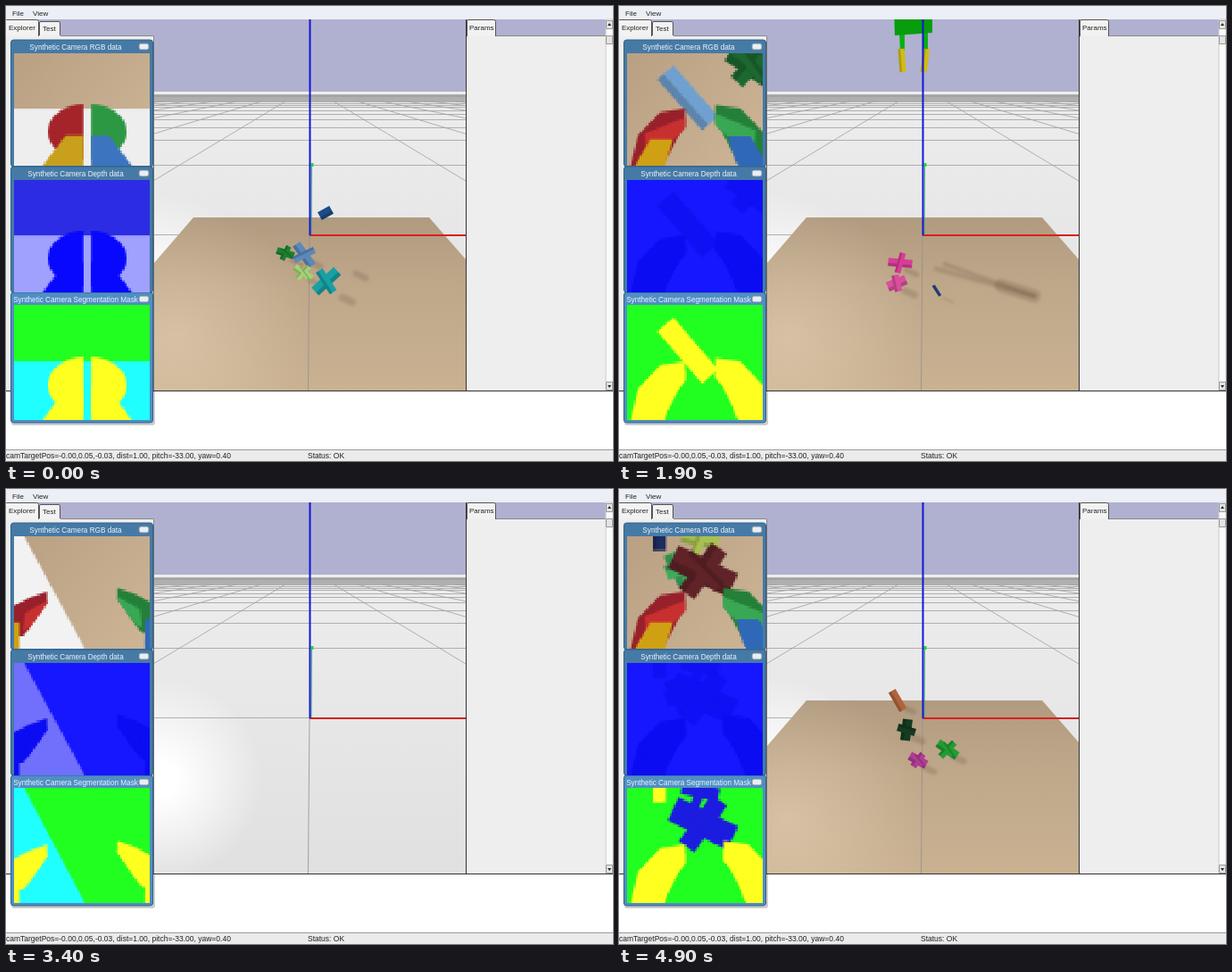
An HTML page with a canvas that plays this animation: 680x510 px, repeating every 5000 ms.

```html
<!DOCTYPE html>
<html>
<head>
<meta charset="utf-8">
<style>
html, body { margin: 0; width: 100%; height: 100%; overflow: hidden; background: #fff; }
svg, canvas { position: absolute; left: 0; top: 0; }
text { font: 8px "Liberation Sans", Arial, sans-serif; fill: #222; }
.title { font-size: 8.2px; fill: #eef4fa; text-anchor: middle; }
.status { font-size: 8.5px; }
.tab { fill: #f2f2f2; stroke: #555; }
</style>
</head>
<body>
<svg width="680" height="510">
  <rect width="680" height="15" fill="#eceff5"/>
  <path d="M0 15h680v18H0z" fill="#b0b0d0"/>
  <path d="M0 33h166v398H0zM516 33h164v398H516z" fill="#eee"/>
  <path d="M61 33.5H165.5V431M548 33.5H672" fill="none" stroke="#888"/>
  <path class="tab" d="M-1 34V17q0-1.500 1.500-1.500H34.500q2 0 2 2V34M37.500 33V19q0-1.500 1.500-1.500H59q1.500 0 1.500 1.500V33M516.500 34V17q0-1.500 1.500-1.500H546.500q2 0 2 2V34"/>
  <path d="M672 15h8v416h-8z" fill="#fafafa" stroke="#ccc"/>
  <path d="M672.500 16.500h7v9h-7zM672.500 421.500h7v9h-7zM672.500 33.500h7v9h-7z" fill="#e4e4e4" stroke="#999"/>
  <path d="M674 22l2-3 2 3zM674 425l2 3 2-3z" fill="#222"/>
  <path d="M0 431.500H680M515.500 15V431" stroke="#333"/>
  <path d="M0 497h680v13H0z" fill="#ebebeb"/>
  <path d="M0 497.500H680" stroke="#999"/>
  <rect x="6" y="40" width="161" height="430" rx="3" fill="#0003"/>
  <g id="windows"></g>
  <text x="7" y="10.500">File</text><text x="30" y="10.500">View</text>
  <text x="3" y="26.500">Explorer</text><text x="41" y="27.500">Test</text><text x="519" y="26.500">Params</text>
  <text class="status" x="0" y="507">camTargetPos=-0.00,0.05,-0.03, dist=1.00, pitch=-33.00, yaw=0.40</text>
  <text class="status" x="338" y="507">Status: OK</text>
</svg>
<canvas id="stage" width="680" height="510"></canvas>
<script>
const g = document.getElementById('stage').getContext('2d');
const small = document.createElement('canvas');
small.width = 64; small.height = 53;
const s = small.getContext('2d');
const LOOP = 5000, STEP = 100;
const YEL = '#ffff20', CYAN = '#20ffff', BLUE = '#1c1ce0', LIME = '#20ff20';

const clamp = v => Math.max(0, Math.min(1, v));
const mix = (a, b, k) => a + (b - a) * k;

// title, top, bottom, image top, image height, color
const windows = [
  ['RGB data', 38, 180, 53, 126, '#467aa6'],
  ['Depth data', 180, 321, 195, 126, '#467aa6'],
  ['Segmentation Mask', 321, 467, 335, 129, '#4f8fc4']
];
document.getElementById('windows').innerHTML = windows.map(([name, y, end, , , fill]) => `
  <rect x="5.500" y="${y}" width="159" height="${end - y}" rx="3" fill="${fill}" stroke="#2f618c"/>
  <text class="title" x="78" y="${y + 10.5}">Synthetic Camera ${name}</text>
  <rect x="149" y="${y + 4}" width="11" height="7" rx="2" fill="#e8eef4" stroke="#789"/>`).join('');

function fill(c, p, color) {
  c.beginPath();
  for (let i = 0; i < p.length; i += 2) c.lineTo(p[i], p[i + 1]);
  c.fillStyle = color;
  c.fill();
}

// random-looking solid: bars crossing at one point, each shorter and thinner
function solid(c, color, x, y, len, wid, angle, arms, shaded = true) {
  c.save();
  c.translate(x, y);
  c.rotate(angle);
  for (let i = 0; i < arms; i++) {
    const l = len * (1 - .15 * i), w = wid * (1 - .25 * i);
    c.fillStyle = color;
    c.fillRect(-l / 2, -w / 2, l, w);
    if (shaded) {
      c.fillStyle = '#0000002c';
      c.fillRect(-l / 2, w / 8, l, w * 3 / 8);
    }
    c.rotate(1.74);
  }
  c.restore();
}

/* ---------- 3D view ---------- */

// objects: color, x, y, length, width, angle, arms; they land in turn from `first` every `gap` ms
// grip: time, palm x, palm y, finger spread; held: object index, grab time, palm y
const episodes = [
  { from: 0, first: -400, gap: 175, held: [1, 1000, 238], cast: [385, 306, 458, 331],
    grip: [[500, 326, 40, 10], [800, 326, 220, 10], [1000, 326, 238, 8], [1200, 326, 205, 7]],
    objects: [
      ['#1c8030', 313, 277, 20, 8, .3, 3],
      ['#5c89ba', 334, 279, 30, 10, .95, 2],
      ['#a4d274', 333, 299, 23, 8, .6, 3],
      ['#18a0a4', 370, 319, 34, 12, -.5, 2],
      ['#1c4c88', 385, 292, 15, 10, .1, 1]
    ] },
  { from: 1300, first: 1300, gap: 310, held: [3, 2250, 206], cast: [360, 292, 465, 325], swap: true,
    grip: [[1900, 329, 20, 13], [2250, 329, 232, 9], [2400, 329, 206, 9], [2700, 329, 30, 9]],
    objects: [
      ['#1c4478', 356, 319, 14, 3.5, 1, 1],
      ['#d83c98', 315, 288, 27, 9, .1, 2],
      ['#d8509c', 313, 311, 22, 11, -.35, 2],
      ['#b07068', 337, 263, 21, 8, .3, 2]
    ] },
  { from: 3400, empty: true, objects: [] },
  { from: 3500, first: 3700, gap: 80, held: [2, 4400, 236], cast: [370, 307, 508, 357],
    grip: [[3900, 338, 20, 18], [4200, 338, 206, 18], [4400, 338, 236, 15], [4600, 338, 208, 9]],
    objects: [
      ['#1c76b8', 314, 285, 26, 9, 0, 2],
      ['#a0b03c', 324, 309, 28, 12, -.5, 3],
      ['#583034', 336, 287, 26, 12, 1, 3],
      ['#202c60', 348, 303, 21, 9, 1.65, 1]
    ] },
  { from: 4700, first: 4750, gap: 50, objects: [
      ['#b03c94', 335, 304, 21, 10, .5, 3],
      ['#143c20', 322, 270, 24, 11, 1.7, 2],
      ['#249c34', 368, 292, 26, 10, .6, 3],
      ['#b0643c', 312, 237, 25, 9, 1.05, 1]
    ] }
];

function shadow(x1, y1, x2, y2, w) {
  g.save();
  g.filter = 'blur(1.5px)';
  g.lineCap = 'round';
  line('#50402c30', w, x1, y1, x2, y2);
  g.restore();
}

function line(color, w, x1, y1, x2, y2) {
  g.strokeStyle = color; g.lineWidth = w;
  g.beginPath(); g.moveTo(x1, y1); g.lineTo(x2, y2); g.stroke();
}

function gripperAt(keys, t) {
  if (!keys || t < keys[0][0] || t > keys.at(-1)[0]) return null;
  const i = Math.max(1, keys.findIndex(k => k[0] >= t)), a = keys[i - 1], b = keys[i];
  return a.map((v, n) => mix(v, b[n], (t - a[0]) / (b[0] - a[0])));
}

function drawGripper([, x, y, spread], swap) {
  const [palm, tip] = swap ? ['#08b010', '#d0bc10'] : ['#d0c408', '#109020'];
  for (const side of [-1, 1]) {
    const f = x + 1 + side * spread;
    fill(g, [f - 3, y + 10, f + 3, y + 10, f + 3, y + 30, f - 2, y + 30], palm);
    solid(g, tip, f, y + 41, 26, 7, 1.6 + side * .1, 1);
  }
  fill(g, [x - 21, y - 13, x + 17, y - 14, x + 22, y - 8, x + 22, y + 10, x - 20, y + 13], palm);
  fill(g, [x - 20, y - 6, x + 22, y - 8, x + 22, y + 10, x - 20, y + 13], '#0000001c');
}

function drawGround() {
  g.fillStyle = '#b0b0d0'; g.fillRect(166, 15, 349, 82);
  let b = g.createLinearGradient(0, 96, 0, 431);
  b.addColorStop(0, '#ededed'); b.addColorStop(1, '#e0e0e0');
  g.fillStyle = b; g.fillRect(166, 96, 349, 335);
  b = g.createRadialGradient(172, 325, 20, 172, 325, 115);
  b.addColorStop(0, '#fff'); b.addColorStop(1, '#fff0');
  g.fillStyle = b; g.fillRect(166, 96, 349, 335);
  // unit grid seen in perspective
  for (let i = -10; i <= 10; i++) {
    const y = Math.round(90.6 + 185 / (11.12 + i)) + .5;
    line('#a0a0a0', .8, 166, y, 515, y);
    if (i) line('#a0a0a0', .8, 340 + i * 27.2, 107, 340 + i * 565, 431);
  }
}

function drawTable() {
  const b = g.createLinearGradient(0, 237, 0, 431);
  b.addColorStop(0, '#b19b80'); b.addColorStop(.4, '#bfa78a'); b.addColorStop(1, '#c9b192');
  const edge = [210,237, 474,237, 515,284, 515,431, 166,431, 166,288];
  fill(g, edge, b);
  const light = g.createRadialGradient(190, 370, 5, 190, 370, 150);
  light.addColorStop(0, '#ead8bc78'); light.addColorStop(1, '#ead8bc00');
  fill(g, edge, light);
}

function drawObject(e, i, t, hand) {
  const [color, x, y, len, wid, angle, arms] = e.objects[i];
  const u = Math.max(0, (e.first + i * e.gap - t) / 300);
  if (u > 1) return;
  let lift = 0;
  if (e.held && e.held[0] === i) {
    const [, grab, palm] = e.held;
    if (t >= grab && !hand) return;
    lift = (t < grab ? Math.max(...e.grip.map(k => k[2])) : hand[2]) - palm;
  }
  shadow(x + 7, y + 8, x + 18, y + 13, wid * .7);
  solid(g, color, x - 27 * u, y - 60 * u * u + lift, len, wid, angle - .6 * u, arms);
}

function drawView(t) {
  const e = episodes.findLast(e => t >= e.from);
  const hand = gripperAt(e.grip, t);
  g.save();
  g.beginPath(); g.rect(166, 15, 349, 416); g.clip();
  drawGround();
  if (!e.empty) drawTable();
  line('#909090', .8, 340, 257, 338.5, 431);
  if (hand) {
    const [x1, y1, x2, y2] = e.cast;
    for (const d of [-5, 5]) shadow(x1 + d, y1 - d / 2, x2, y2, 5);
    shadow(mix(x1, x2, .65), mix(y1, y2, .65), x2, y2, 15);
  }
  line('#d82020', 2, 340, 257, 515, 257);
  line('#30b070', 1, 342.5, 180, 342, 256);
  line('#10e030', 3, 343, 176, 343, 180);
  if (hand) drawGripper(hand, e.swap);
  line('#1414d8', 2, 340.5, 15, 340.5, 257);
  e.objects.forEach((_, i) => drawObject(e, i, t, hand));
  g.restore();
}

/* ---------- camera windows ---------- */

// shapes: color, mask, x, y, length, width, angle, arms, shift before the grasp, flat depth color
const cameras = [
  { from: 0, front: true, depth: '#2c2ce4', shapes: [['#eee', CYAN, 76, 94, 152, 64, 0, 1, 0, 0, '#a0a0ff']] },
  { from: 500, start: 800, end: 1200, zoom: 1, left: 0, right: 11, shapes: [
    ['#1c6830', LIME, 140, 14, 58, 24, .6, 3, -14, 31],
    ['#98c860', BLUE, 66, -20, 24, 13, -.75, 1, 0, 28],
    ['#70a0d0', YEL, 68, 50, 76, 24, .85, 1, -4, 2]
  ] },
  { from: 2000, start: 2100, end: 2400, zoom: .9, left: -6, right: 0, shapes: [
    ['#e03ca0', BLUE, 127, 14, 56, 38, .9, 1, 0, 0],
    ['#d07c74', CYAN, 66, 17, 76, 36, -.1, 1, 0, 0],
    ['#d07c74', CYAN, 77, 46, 52, 28, 1.4, 1, 0, 0]
  ] },
  { from: 3000, start: 4000, end: 4100, zoom: 1, shapes: [
    ['#f2f2f2', CYAN, -43, 110, 200, 200, 1.076, 1, 0, 0, '#7070fc']
  ] },
  { from: 4000, start: 4200, end: 4600, zoom: .75, left: 0, right: 20, shapes: [
    ['#1c2c60', YEL, 36, 4, 24, 15, 1.57, 1, 18, 6],
    ['#a8c050', BLUE, 82, 4, 42, 14, .2, 2, 28, 0],
    ['#2c68c0', CYAN, 84, 46, 56, 20, .1, 1, 42, 24],
    ['#3cac5c', LIME, 60, 36, 40, 22, 1.1, 2, 28, 24],
    ['#602428', BLUE, 85, 39, 74, 28, .45, 3, 10, 0]
  ] }
];

// a part takes its own color in each of the three windows
const pick = (mode, rgb, depth, mask) => [rgb, depth, mask][mode];

// one finger, k from open to closed; the right one is its mirror image
function drawFinger(mode, k, side, shift) {
  const tip = 37 + 28 * k, low = 112 + 14 * k;
  const [outer, inner, base] = side ? ['#248038', '#38a854', '#3068b8'] : ['#98202a', '#c83030', '#d0a014'];
  const paint = (p, color, dx = 0, dy = 0) => fill(s, p.map((v, i) =>
    i % 2 ? v - 4 * side + dy : side ? 153 - v + shift * k : v + shift * k), pick(mode, color, '#0c0cf2', YEL));
  paint([tip, 62, tip - 20 - 8 * k, 69 - 3 * k, 12 * k, 78 + 14 * k, 4 * k, low,
    10 + 30 * k, low, 18 + 40 * k, 102 - 10 * k, tip, 75 + 8 * k], outer);
  paint([tip, 72, 12 + 8 * k, 86 + 4 * k, 10 + 12 * k, low - 6, 18 + 40 * k, 102 - 10 * k, tip, 75 + 8 * k], inner);
  paint([26 * k, 97, 6 + 45 * k, 97, 6 + 36 * k, 127, 8 * k, 127], base);
  if (side) paint([0, 120, 6 + 34 * k, 120, 6 + 34 * k, 132, 0, 132], base);
}

// both fingers seen from the front: half a disc over a widening base
function drawFront(mode) {
  for (const side of [-1, 1]) {
    const x = 82 + 4 * side;
    s.fillStyle = pick(mode, side < 0 ? '#a4242a' : '#2c9844', '#0808ff', YEL);
    s.beginPath();
    s.ellipse(x, 88, 40, 31, 0, -Math.PI / 2, Math.PI / 2, side < 0);
    s.fill();
    fill(s, [x, 92, x + 20 * side, 92, x + 46 * side, 126, x, 126],
      pick(mode, side < 0 ? '#c8a01c' : '#3c74c0', '#0808ff', YEL));
  }
}

function drawCamera(mode, t) {
  const c = cameras.findLast(c => t >= c.from);
  const k = clamp((t - c.start) / (c.end - c.start)) || 0;
  s.setTransform(64 / 152, 0, 0, 53 / 126, 0, 0);
  const wood = s.createLinearGradient(0, 0, 152, 126);
  wood.addColorStop(0, '#b9a083'); wood.addColorStop(1, '#cdb596');
  s.fillStyle = pick(mode, wood, c.depth || '#1616ff', LIME);
  s.fillRect(0, 0, 152, 126);
  const z = mix(c.zoom || 1, 1, k);
  for (const [rgb, mask, x, y, len, wid, angle, arms, dx, dy, depth] of c.shapes) {
    solid(s, pick(mode, rgb, depth || '#1010f4', mask), 84 + (x - 84) * z + dx * (1 - k),
      39 + (y - 39) * z + dy * (1 - k), len * z, wid * z, angle, arms, !mode && !depth);
  }
  if (c.front) return drawFront(mode);
  drawFinger(mode, k, 0, c.left || 0);
  drawFinger(mode, k, 1, c.right || 0);
}

let last = -1;
function frame(now) {
  const t = Math.floor(now % LOOP / STEP) * STEP;
  if (t !== last) {
    last = t;
    drawView(t);
    g.imageSmoothingEnabled = false;
    windows.forEach(([, , , y, h], mode) => {
      drawCamera(mode, t);
      g.drawImage(small, 9, y, 152, h);
    });
  }
  requestAnimationFrame(frame);
}
frame(0);
</script>
</body>
</html>
```
